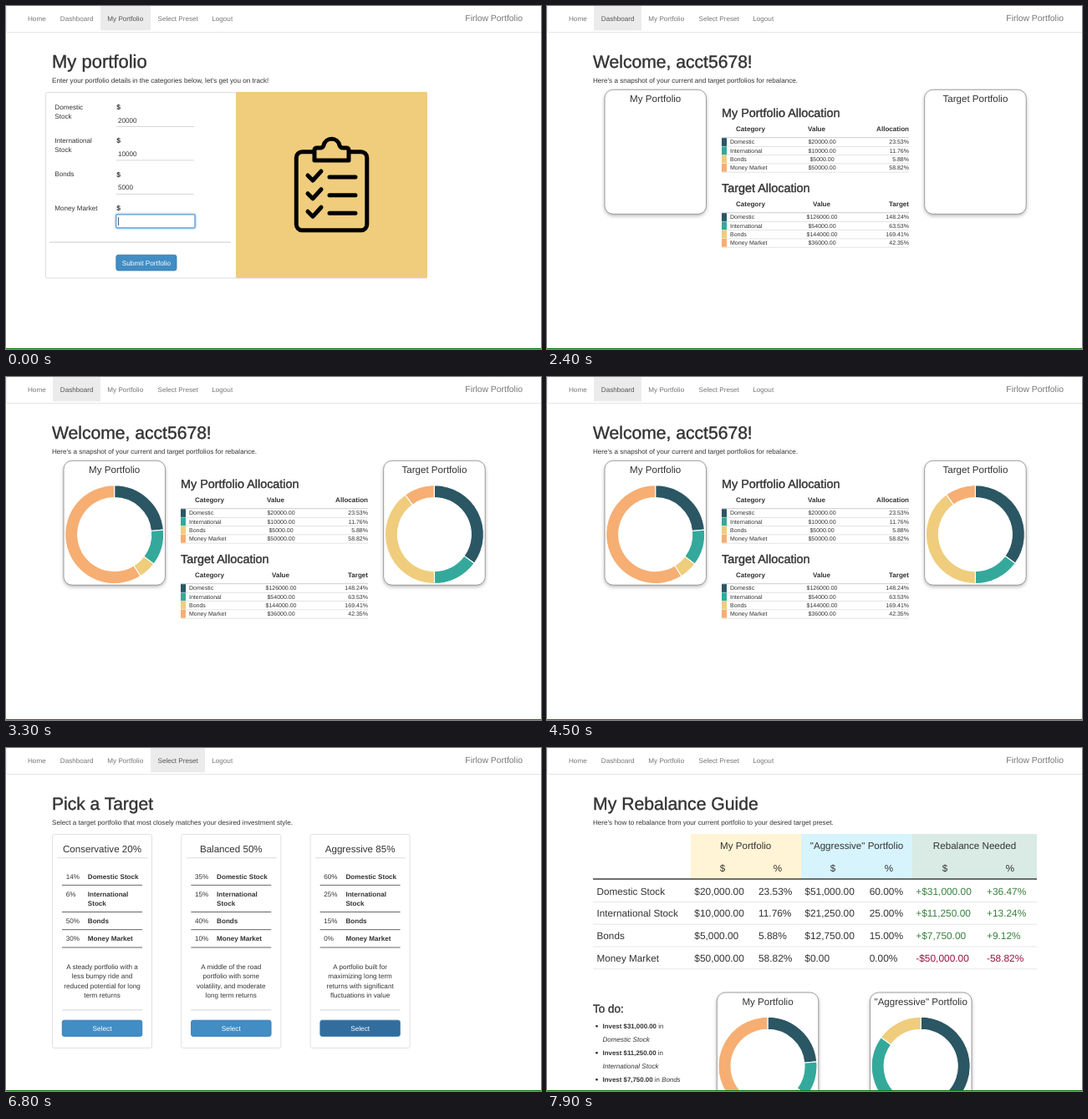
Animation of 640x411 px, one loop 8 s. Source, as an HTML page:

```html
<!DOCTYPE html>
<html lang="en">
<head>
<meta charset="utf-8">
<title>Portfolio rebalance</title>
<style>
html, body { margin: 0; width: 100%; height: 100%; overflow: hidden; background: #fff; }
svg { display: block; width: 640px; height: 411px; font-family: "Liberation Sans", Arial, sans-serif; fill: #333; }
text { white-space: pre; text-rendering: geometricPrecision; }
.m { text-anchor: middle; }
.e { text-anchor: end; }
.b { font-weight: 700; }
.i { font-style: italic; }
.h { stroke: #333; stroke-width: .4px; }
.card { filter: drop-shadow(0 2px 2px #0004); }
</style>
</head>
<body>
<svg id="stage" viewBox="0 0 640 411"></svg>
<script>
const LOOP = 8000;
const COLORS = ['#2b5664', '#34a99b', '#efcd7d', '#f6ae73'];
const ASSETS = ['Domestic', 'International', 'Bonds', 'Money Market'];
const FULL = ['Domestic Stock', 'International Stock', 'Bonds', 'Money Market'];
const MINE = [23.53, 11.76, 5.88, 58.82];

const text = (x, y, size, str, cls = '', fill = '') =>
  `<text x="${x}" y="${y}" font-size="${size}" class="${cls}"${fill && ` fill="${fill}"`}>${str}</text>`;
const rect = (x, y, w, h, fill, extra = '') =>
  `<rect x="${x}" y="${y}" width="${w}" height="${h}" fill="${fill}" ${extra}/>`;
const rule = (x1, x2, y, color = '#ddd', w = 1) => rect(x1, y - w / 2, x2 - x1, w, color);
const list = (items, fn) => items.map(fn).join('');

const heading = (title, size, sub) => text(55, 74, size, title, 'h') + text(55, 91.5, 8.1, sub);
const caption = (x, y, str) => text(x, y, 11.6, str, 'm');
const button = (id, x, y, w, h, label) =>
  rect(x, y, w, h, '#418dc4', `id="${id}" rx="2.5" stroke="#3579b0" stroke-width=".8"`) +
  text(x + w / 2, y + h / 2 + 3, 8.25, label, 'm', '#fff');

// Doughnut charts: each one is a card with a title and arcs that sweep open.
const charts = [];
function chart(x, y, title, shares, start) {
  const id = 'chart' + charts.length;
  charts.push({ id, cx: x + 60.7, cy: y + 88.3, shares, start });
  return rect(x, y, 121.5, 149, '#fff', 'class="card" rx="10" stroke="#888" stroke-width=".8"') +
    caption(x + 60.7, y + 14.8, title) +
    `<g id="${id}" stroke="#fff" stroke-width="1.1">${list(shares, (s, i) => `<path fill="${COLORS[i]}"/>`)}</g>`;
}

function arc(cx, cy, from, to, outer = 59, inner = 44) {
  const at = (r, a) => `${cx + r * Math.sin(a)} ${cy - r * Math.cos(a)}`;
  const big = +(to - from > Math.PI);
  return `M${at(outer, from)}A${outer} ${outer} 0 ${big} 1 ${at(outer, to)}` +
    `L${at(inner, to)}A${inner} ${inner} 0 ${big} 0 ${at(inner, from)}Z`;
}

function drawChart({ id, cx, cy, shares, start }, now) {
  const x = Math.min(1, Math.max(0, (now - start) / 1000));
  const sweep = (1 - (1 - x) ** 4) * Math.PI * 2 / 100;
  let sum = 0;
  [...document.getElementById(id).children].forEach((path, i) => {
    const from = sum * sweep;
    sum += shares[i];
    path.setAttribute('d', x ? arc(cx, cy, from, sum * sweep) : '');
  });
}

function formPage() {
  const labels = [['Domestic', 'Stock'], ['International', 'Stock'], ['Bonds'], ['Money Market']];
  const values = [20000, 10000, 5000];
  const check = y => `<path d="M361 ${y - 2}l6 6l10 -11M387 ${y}h31"/>`;
  return heading('My portfolio', 22, "Enter your portfolio details in the categories below, let's get you on track!") +
    rect(47.5, 103.5, 456, 222.5, '#fff', 'rx="2" stroke="#ddd"') +
    rect(275, 103, 229, 223, '#efcd7d', 'rx="1.5"') +
    list(labels, (words, i) => list(words, (w, j) => text(58.3, 123.6 + 40.4 * i + 11.4 * j, 8.1, w)) +
      text(132.3, 123.8 + 40.4 * i, 8.6, '$', 'b')) +
    list(values, (v, i) => text(134, 139.6 + 40.4 * i, 8.1, v) + rule(132, 225, 144.5 + 40.4 * i, '#ccc', .8)) +
    rect(131.8, 249.8, 94.2, 16, '#fff', 'id="field" rx="1" stroke="#5f9fd8" stroke-width="1.3" style="filter:drop-shadow(0 0 1.5px #66afe9)"') +
    text(134, 261, 8.1, '', 'typed') + rect(134, 253, .8, 10, '#333', 'id="caret"') +
    rule(52, 269, 283, '#ccc') +
    button('submit', 131.8, 298.2, 72.2, 18.8, 'Submit Portfolio') +
    `<g fill="none" stroke="#000" stroke-width="5" stroke-linecap="round" stroke-linejoin="round">
      <rect x="347.3" y="174.8" width="84.5" height="94" rx="7"/>
      <path fill="#efcd7d" d="M369 185V173Q369 170 372 170H376Q379 170 380 167A9.7 9.7 0 0 1 399 167Q400 170 403 170H407Q410 170 410 173V185Z"/>
      ${list([205, 226.7, 248.2], check)}</g>`;
}

function allocation(y, title, valueX, lastHead, amounts, percents) {
  return text(209, y, 14.4, title, 'h') +
    text(226, y + 17, 8.05, 'Category', 'b') + text(valueX, y + 17, 8.05, 'Value', 'b m') +
    text(433, y + 17, 8.05, lastHead, 'b e') + rule(209, 433, y + 25, '#ccc') +
    list(ASSETS, (name, i) => {
      const top = y + 25.5 + 10.25 * i;
      return rule(209, 433, top + 10.2, '#ddd', .8) + rect(209, top, 6, 9.7, COLORS[i]) +
        text(219, top + 7.2, 7, name) + text(329, top + 7.2, 7, `$${amounts[i]}.00`, 'm') +
        text(433, top + 7.2, 7, percents[i].toFixed(2) + '%', 'e');
    });
}

function dashboardPage() {
  return heading('Welcome, acct5678!', 21.1, "Here's a snapshot of your current and target portfolios for rebalance.") +
    chart(69, 100.3, 'My Portfolio', MINE, 2441) +
    chart(451.7, 100.3, 'Target Portfolio', [35, 15, 40, 10], 2459) +
    allocation(132.7, 'My Portfolio Allocation', 322.5, 'Allocation', [20000, 10000, 5000, 50000], MINE) +
    allocation(222.7, 'Target Allocation', 328.5, 'Target', [126000, 54000, 144000, 36000], [148.24, 63.53, 169.41, 42.35]);
}

function presetPage() {
  const presets = [
    ['Conservative 20%', [14, 6, 50, 30], ['A steady portfolio with a', 'less bumpy ride and', 'reduced potential for long', 'term returns']],
    ['Balanced 50%', [35, 15, 40, 10], ['A middle of the road', 'portfolio with some', 'volatility, and moderate', 'long term returns']],
    ['Aggressive 85%', [60, 25, 15, 0], ['A portfolio built for', 'maximizing long term', 'returns with significant', 'fluctuations in value']]];
  const base = [156.7, 178, 210.3, 231.4], lines = [164.3, 196.5, 217.7, 239];
  return heading('Pick a Target', 21, 'Select a target portfolio that most closely matches your desired investment style.') +
    list(presets, ([title, shares, about], p) => `<g transform="translate(${55.5 + 154.3 * p})">` +
      rect(0, 103.5, 119, 256, '#fff', 'rx="2" stroke="#ddd" stroke-width=".9"') +
      caption(59.5, 125, title) + rule(6, 114, 131.7, '#ddd') +
      list(['Domestic Stock', ...ASSETS.slice(1)], (name, i) => text(16.2, base[i], 8.1, shares[i] + '%') +
        text(42.3, base[i], 8.1, name, 'b') + rule(11.5, 107.5, lines[i], '#555', .9)) +
      text(42.3, 189.2, 8.1, 'Stock', 'b') +
      list(about, (line, i) => text(59.5, 264.8 + 11.4 * i, 8.1, line, 'm')) +
      rule(11.5, 107.5, 314, '#ccc', .9) + button('pick' + p, 11.7, 326.2, 95.6, 19.3, 'Select') + '</g>');
}

function guidePage() {
  const rows = [
    ['$20,000.00', '23.53%', '$51,000.00', '60.00%', '+$31,000.00', '+36.47%'],
    ['$10,000.00', '11.76%', '$21,250.00', '25.00%', '+$11,250.00', '+13.24%'],
    ['$5,000.00', '5.88%', '$12,750.00', '15.00%', '+$7,750.00', '+9.12%'],
    ['$50,000.00', '58.82%', '$0.00', '0.00%', '-$50,000.00', '-58.82%']];
  const columns = [176.3, 253, 308.3, 385.7, 441.3, 526];
  const todo = (y, amount, rest) => `<circle cx="59.5" cy="${y - 2.7}" r="1.4"/>` +
    text(66.5, y, 7.9, `<tspan class="b">Invest ${amount}</tspan> in ${rest}`);
  return heading('My Rebalance Guide', 21.2, "Here's how to rebalance from your current portfolio to your desired target preset.") +
    rect(172, 103, 132, 54, '#fff4d5') + rect(304, 103, 133, 54, '#d7f4fd') + rect(437, 103, 149, 54, '#d9ebe4') +
    caption(237.7, 120.7, 'My Portfolio') + caption(370.5, 120.7, '"Aggressive" Portfolio') +
    caption(511.5, 120.7, 'Rebalance Needed') +
    list([210, 276, 342, 409, 476, 554], (x, i) => caption(x, 148, '$%'[i % 2])) +
    rule(55, 586, 157, '#222', 1.3) +
    list(rows, (row, r) => {
      const y = 175.6 + 26.8 * r;
      return text(59.5, y, 11.75, FULL[r]) + rule(55, 586, y + 8.8, '#e6e6e6') +
        list(row, (cell, c) => text(columns[c], y, 11.9, cell, '', c < 4 ? '' : r < 3 ? '#37803d' : '#95143c'));
    }) +
    text(55, 317.3, 13.5, 'To do:', 'h') +
    todo(336, '$31,000.00', '') + text(66.5, 352, 8.1, FULL[0], 'i') +
    todo(368, '$11,250.00', '') + text(66.5, 384, 8.1, FULL[1], 'i') +
    todo(400, '$7,750.00', '<tspan class="i">Bonds</tspan>') +
    chart(203.3, 293, 'My Portfolio', MINE, 6990) +
    chart(386.5, 293, '"Aggressive" Portfolio', [60, 25, 15], 7008);
}

// Each page: start time, content, and the highlighted tab.
const pages = [[0, formPage(), 2], [2200, dashboardPage(), 1], [4800, presetPage(), 3], [7000, guidePage(), -1]];
const tabs = [['Home', 26, 18, 38], ['Dashboard', 64.8, 56, 57], ['My Portfolio', 121.3, 113, 60], ['Select Preset', 181.5, 173, 65], ['Logout', 246.3, 238, 42]];

const stage = document.getElementById('stage');
stage.innerHTML = rect(0, 0, 640, 411, '#fff') +
  list(tabs, ([, , x, w]) => rect(x, 0, w, 29.3, '#ebebeb', 'class="tab"')) +
  rule(1, 640, 31.5, '#e5e5e5') + rect(.3, 0, .8, 31, '#e8e8e8') +
  list(tabs, ([label, x]) => text(x, 17.9, 8.15, label, 'link')) +
  text(618, 18.4, 10.4, 'Firlow Portfolio', 'e', '#777') +
  list(pages, ([, content]) => `<g class="page">${content}</g>`) +
  rect(0, 410, 640, 1, '#0c7a12');

const all = name => [...stage.querySelectorAll(name)];
const pageEls = all('.page'), tabEls = all('.tab'), links = all('.link');
const [typed] = all('.typed'), [caret] = all('#caret'), [submit] = all('#submit'), [pick] = all('#pick2');

function hover(el, amount) {
  const k = Math.min(1, Math.max(0, amount));
  const mix = (a, b) => Math.round(a + (b - a) * k);
  el.setAttribute('fill', `rgb(${mix(65, 50)},${mix(141, 109)},${mix(196, 158)})`);
}

function render(now) {
  const current = pages.findLastIndex(([start]) => now >= start);
  const active = pages[current][2];
  pageEls.forEach((el, i) => el.style.display = i === current ? '' : 'none');
  tabEls.forEach((el, i) => el.style.display = i === active ? '' : 'none');
  links.forEach((el, i) => el.setAttribute('fill', i === active ? '#555' : '#777'));

  const count = Math.min(5, Math.max(0, Math.floor(now / 120)));
  typed.textContent = '50000'.slice(0, count);
  caret.setAttribute('x', 134 + count * 4.5);
  caret.style.display = now >= 900 && now < 1300 || now >= 1900 ? 'none' : '';
  hover(submit, (now - 1750) / 150);
  hover(pick, (now - 6150) / 150);
  charts.forEach(c => drawChart(c, now));
}

function tick() {
  render(performance.now() % LOOP);
  requestAnimationFrame(tick);
}
tick();
</script>
</body>
</html>
```
